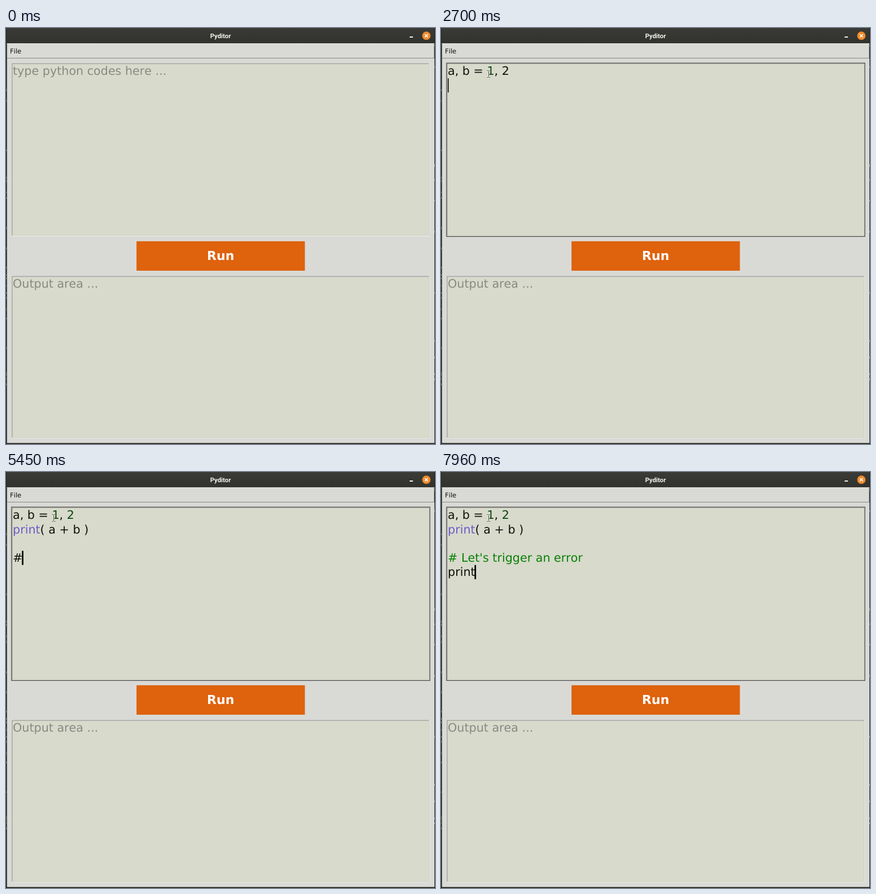
An HTML page with a canvas that plays this animation: 760 by 737 pixels, repeating every 8000 ms.

```html
<!DOCTYPE html>
<html lang="en">
<head>
<meta charset="utf-8">
<title>Pyditor</title>
<style>
  html, body { margin: 0; width: 100%; height: 100%; overflow: hidden; background: #d9dad6; }
  canvas { display: block; }
</style>
</head>
<body>
<canvas id="stage" width="760" height="737"></canvas>
<script>
const ctx = document.getElementById("stage").getContext("2d");
const LOOP = 8000, FOCUS = 970, MOUSE_IN = 70, MOUSE_STOP = 290, HIGHLIGHT_DELAY = 40;
const LEFT = 12, BASELINE = 83.4, ROW = 25.2, PIXEL = 0.97;
const CODE_FONT = "20.7px 'DejaVu Sans', sans-serif";
const INK = "#10110c", HINT = "#888a82", PAPER = "#d8dacb", PANEL = "#d9dad6";

// bursts of evenly spaced keys: text, time of the first key, time of the last key
const bursts = [
  ["a, b =", 1200, 1990],
  [" 1, 2\n", 2040, 2700],
  ["print(", 2880, 3300],
  [" a", 3450, 3620],
  [" + b", 3860, 4290],
  [" )", 4530, 4730],
  ["\n\n", 4880, 5060],
  ["#", 5220, 5220],
  [" Let's t", 5580, 6050],
  ["rigger an", 6210, 6720],
  [" er", 6760, 6980],
  ["ror\n", 7060, 7480],
  ["print", 7760, 7960]
];
const keys = bursts.flatMap(([str, first, last]) => [...str].map((char, i) =>
  ({ char, time: first + (last - first) * i / Math.max(1, str.length - 1) })));

function seededRandom(seed) {
  return () => (seed = seed * 16807 % 2147483647) / 2147483647;
}

function box(x, y, w, h, color) {
  ctx.fillStyle = color;
  ctx.fillRect(x, y, w, h);
}

function text(str, x, y, font, color, align = "left") {
  ctx.font = font;
  ctx.fillStyle = color;
  ctx.textAlign = align;
  ctx.fillText(str, x, y);
}

function line(color, width, ...segments) {
  ctx.strokeStyle = color;
  ctx.lineWidth = width;
  ctx.beginPath();
  for (const [x1, y1, x2, y2] of segments) {
    ctx.moveTo(x1, y1);
    ctx.lineTo(x2, y2);
  }
  ctx.stroke();
}

function sunkenArea(y, h, focused) {
  const x = 10.4, w = 740, p = PIXEL;
  if (focused) box(x - p, y - p, w + 2 * p, h + 2 * p, "#11120f");
  box(x, y, w, h, "#f8f9f5");
  box(x, y, w - p, h - p, "#858680");
  box(x + p, y + p, w - 2 * p, h - 2 * p, PAPER);
}

// bits of the desktop showing beside the window
function drawDesktop() {
  const random = seededRandom(7);
  const colors = ["#74756f", "#696a64", "#7c7d77", "#5f7128"];
  box(0, 0, 760, 737, "#20211d");
  for (let i = 0; i < 36; i++)
    box(i % 3 ? 0 : 759, 30 + random() * 640, 1, 3, colors[Math.floor(random() * colors.length)]);
}

function drawWindow(focused) {
  drawDesktop();
  const bar = ctx.createLinearGradient(0, 0, 0, 28);
  bar.addColorStop(0, "#3a3b36");
  bar.addColorStop(1, "#31322d");
  box(1, 0, 758, 28, bar);
  box(1.7, 27.4, 757.3, 707.9, PANEL);

  text("Pyditor", 380, 18, "bold 11.3px Roboto, sans-serif", "#f4f4ef", "center");
  box(715, 15, 6, 2, "#efefeb");
  ctx.fillStyle = "#ef8b2c";
  ctx.beginPath();
  ctx.arc(744.7, 13.7, 7.4, 0, Math.PI * 2);
  ctx.fill();
  line("#fff", 1.5, [742, 11, 747.4, 16.4], [747.4, 11, 742, 16.4]);

  box(1.7, 27.4, 757.3, PIXEL, "#f3f4f0");
  box(1.7, 52.9, 757.3, PIXEL, "#858681");
  box(758, 28.4, PIXEL, 25, "#858681");
  text("File", 7, 45, "11.6px 'DejaVu Sans', sans-serif", INK);

  sunkenArea(62.6, 306.2, focused);
  sunkenArea(439.6, 287, false);
  text("Output area ...", LEFT, BASELINE + 377, CODE_FONT, HINT);
  box(231.2, 377.8, 298.3, 52.2, "#df620d");
  text("Run", 380.2, 411, "bold 22px 'DejaVu Sans', sans-serif", "#fff", "center");
}

function charColor(row, i, settled) {
  if (!settled) return INK;
  if (row[0] === "#") return "#088008";
  if (/\d/.test(row[i])) return "#0c450c";
  return row.startsWith("print(") && i < 5 ? "#6f5bcb" : INK;
}

function drawCode(t) {
  const typed = keys.filter(key => key.time <= t);
  // words take their colour shortly after a space or a line break
  const settled = typed.findLastIndex(key => /\s/.test(key.char) && key.time + HIGHLIGHT_DELAY <= t);
  const rows = typed.map(key => key.char).join("").split("\n");

  ctx.font = CODE_FONT;
  let offset = 0;
  rows.forEach((row, r) => {
    for (let i = 0; i < row.length; i++) {
      const x = LEFT + ctx.measureText(row.slice(0, i)).width;
      text(row[i], x, BASELINE + r * ROW, CODE_FONT, charColor(row, i, offset + i < settled));
    }
    offset += row.length + 1;
  });

  const caret = LEFT + ctx.measureText(rows.at(-1)).width;
  const start = Math.max(LEFT, caret - 1.2);
  box(start, 64 + (rows.length - 1) * ROW, caret + 1.5 - start, 25, "#000");
}

function drawMouse(t) {
  if (t < MOUSE_IN) return;
  const p = Math.min(1, (t - MOUSE_IN) / (MOUSE_STOP - MOUSE_IN));
  const curve = (a, b, c) => a * (1 - p) ** 2 + 2 * b * p * (1 - p) + c * p * p;
  const x = Math.round(curve(53, 119, 84)) + 0.5, y = Math.round(curve(109, 88, 81)) + 0.5;
  const serifs = [-6, 6].flatMap(dy => [[x - 3, y + dy, x - 0.5, y + dy], [x + 0.5, y + dy, x + 3, y + dy]]);
  const beam = [[x, y - 5, x, y + 5], ...serifs];
  line("#eceee3", 2.4, ...beam);
  line("#4b4c46", 1, ...beam);
}

function frame() {
  const t = performance.now() % LOOP;
  const focused = t >= FOCUS;
  ctx.fontKerning = "none";
  ctx.textRendering = "geometricPrecision";
  drawWindow(focused);
  if (focused) drawCode(t);
  else text("type python codes here ...", LEFT, BASELINE, CODE_FONT, HINT);
  drawMouse(t);
  requestAnimationFrame(frame);
}
frame();
</script>
</body>
</html>
```
